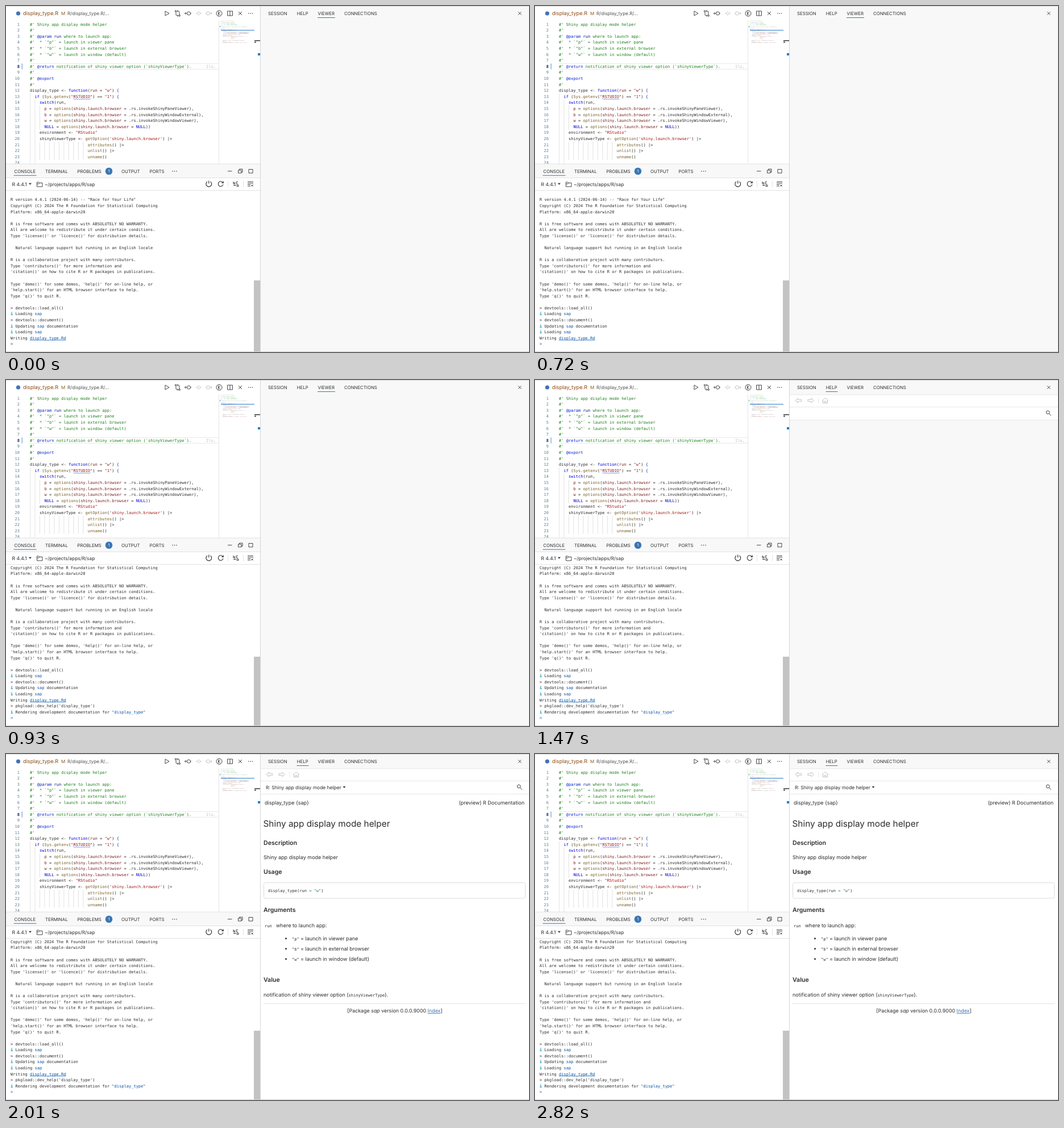
Animation, 920 px wide and 609 px high, one loop 2850 ms. Source, as an HTML page:

```html
<!DOCTYPE html>
<html lang="en">
<head>
<meta charset="utf-8">
<title>Help preview</title>
<style>
  html, body { margin: 0; height: 100%; overflow: hidden; background: #fff; }
  svg { display: block; width: 100vw; height: 100vh; }
  text { font-family: Inter, "Liberation Sans", sans-serif; fill: #2c2c2c; white-space: pre; text-rendering: geometricPrecision; }
  .mono, .mono text { font: 7.05px "DejaVu Sans Mono", monospace; }
  .tab text { font-size: 7.8px; }
  .body text { font-size: 9px; }
  .body .h { font-size: 10.6px; font-weight: 600; }
  .body .mono { font-size: 7.05px; }
  .icon { fill: none; stroke: #333; stroke-width: .9; }
  .pale { stroke: #bdbdbd; }
  .rule { stroke: #e2e2e2; fill: none; }
  .mark { fill: #3a76b4; }
</style>
</head>
<body>
<svg viewBox="0 0 920 609">
  <defs>
    <clipPath id="editClip"><rect y="25" width="447" height="252.5"/></clipPath>
    <clipPath id="conClip"><rect y="325" width="436" height="283"/></clipPath>
  </defs>

  <!-- editor -->
  <rect width="920" height="609" fill="#fff"/>
  <circle cx="21.5" cy="13" r="3.6" fill="#3f74b8"/>
  <text x="30" y="16.3" font-size="9.2" style="fill:#8a4a14">display_type.R</text>
  <text x="97" y="16" font-size="8" style="fill:#8a5a14">M</text>
  <text x="108" y="16.1" font-size="8.2" style="fill:#505050">R/display_type.R/...</text>
  <g class="icon">
    <path d="M280 9l7 4-7 4z"/>
    <path d="M299 10v5a2 2 0 0 0 2 2h2m-1.5-1.500 1.500 1.500-1.500 1.500M305 16v-5a2 2 0 0 0-2-2h-2m1.500-1.500-1.500 1.500 1.500 1.500"/>
    <circle cx="298.600" cy="9" r="1.300"/><circle cx="305.200" cy="17" r="1.300"/>
    <circle cx="321.500" cy="13" r="3"/><path d="M318 13h-3.500m2-2-2 2 2 2M324.500 13h1.500"/>
    <g class="pale">
      <path d="M339 9.800l3.200 3.200-3.200 3.200-3.200-3.200zM334 13h1.800M342.200 13h1.800"/>
      <circle cx="355.500" cy="13" r="3"/><path d="M358.500 13h4m-2-2 2 2-2 2M351 13h1.500"/>
    </g>
    <circle cx="375" cy="13" r="5"/><path d="M373.500 9.500v7M373.500 13l3.500-2.500M373.500 13l3.500 2.500"/>
    <path d="M389.500 9h9v8h-9zM394 9v8"/>
    <path d="M409 10l6 6m0-6-6 6"/>
  </g>
  <g fill="#333"><circle cx="427" cy="13" r=".8"/><circle cx="430.300" cy="13" r=".8"/><circle cx="433.600" cy="13" r=".8"/></g>

  <g clip-path="url(#editClip)">
    <path class="rule" stroke-width=".8" d="M42 101.300H374M42 111.300H374"/>
    <path id="guides" stroke="#d6d6d6" stroke-width=".7"/>
    <g id="nums" class="mono" text-anchor="end"></g>
    <path d="M28.300 101.500v10" stroke="#5b9bd0" stroke-width="1.800" stroke-dasharray="1 .6"/>
    <g id="code" class="mono"></g>
    <path id="wave" fill="none" stroke="#2b6fd6" stroke-width=".7"/>
    <text class="mono" x="352" y="108.700" style="fill:#c4c4c4">Ilo,</text>
  </g>
  <path d="M374.500 25.500V277" stroke="#e4e4e4"/>
  <use href="#code" transform="translate(371.500 22.300) scale(.165 .133)"/>
  <path d="M378 42.700h59" stroke="#4c8fd6" stroke-width="1.300"/>
  <path d="M376.500 35v2.500" stroke="#5aa66a"/>
  <path d="M437 61h10" stroke="#333" stroke-width="1.500"/>
  <path d="M437 62.700h3v2h-3z" fill="#555"/>
  <path d="M443 83h4v4h-4z" fill="#1a7fd0"/>

  <!-- console -->
  <rect y="278" width="447" height="25" fill="#f8f8f8"/>
  <path class="rule" d="M0 278H447M0 302.500H447M0 324.500H447"/>
  <g class="tab">
    <text x="14.500" y="293.500">CONSOLE</text>
    <text x="69" y="293.500">TERMINAL</text>
    <text x="125.500" y="293.500">PROBLEMS</text>
    <text x="203" y="293.500">OUTPUT</text>
    <text x="252.500" y="293.500">PORTS</text>
  </g>
  <path class="mark" d="M13.500 297.700h40v1h-40z"/>
  <circle class="mark" cx="181" cy="290.700" r="6.300"/>
  <text x="181" y="293.200" font-size="7" text-anchor="middle" style="fill:#fff">1</text>
  <g fill="#333"><circle cx="293" cy="290.700" r=".8"/><circle cx="296.500" cy="290.700" r=".8"/><circle cx="300" cy="290.700" r=".8"/></g>
  <text x="10.500" y="316.600" font-size="8.600">R 4.4.1</text>
  <path d="M40 311.800h5l-2.500 3z" fill="#333"/>
  <text x="68" y="316.700" font-size="8.350">~/projects/apps/R/sap</text>
  <g class="icon">
    <path d="M390 290.700h7.500M408.500 289h5.500v5h-5.500zM410.500 289v-2h5.500v5.500h-2M427 287.500h7v6.500h-7z"/>
    <path d="M54.500 310h3.200l1.300 1.400h5v6.600h-9.500zM54.500 313h3.500l1-1.600"/>
    <path stroke-width="1.200" d="M354 309.200a4.900 4.900 0 1 0 5.600 0M356.800 307.500v5"/>
    <path stroke-width="1.100" d="M381.600 311a4.400 4.400 0 1 0 .4 3.200M382.300 308.500v3h-3"/>
    <path d="M400 309v4m0-2h2.500v2H400M408 309.500h-3v3.500h3M400 315.500h4m-1.500-1.300 1.500 1.300-1.500 1.300M406 315h3v2.500h-3z"/>
    <path d="M425 309.500h10M425 312h10M425 314.500h5M425 317h5M431.500 314.500l3 3m0-3-3 3"/>
  </g>
  <path class="rule" d="M390.500 308v11M417.500 308v11"/>
  <g clip-path="url(#conClip)"><g id="console" class="mono"></g></g>
  <rect id="thumb" x="436" width="11" fill="#c3c3c3"/>

  <!-- right panel -->
  <rect x="447" width="473" height="609" fill="#f8f8f8"/>
  <g id="help">
    <rect x="448" y="26" width="472" height="45" fill="#fff"/>
    <path class="rule" stroke-width=".8" d="M448 26H920M448 47.500H920M448 70.500H920M498.500 31v10"/>
    <g class="icon pale">
      <path d="M458 36l4.500-4v2.300h6v3.400h-6V40zM490.500 36l-4.500-4v2.300h-6v3.400h6V40z"/>
      <path d="M505 36.500l5.500-5 5.500 5M506.500 35.500V40.500h8v-5M509 40.500v-3h3v3"/>
    </g>
    <g class="icon" stroke-width="1.100"><circle cx="902.200" cy="57" r="2.900"/><path d="M904.300 59.300l3.500 3.500"/></g>
  </g>
  <g id="page" class="body">
    <rect x="448" y="71" width="472" height="537" fill="#fff"/>
    <text x="457" y="61.700" style="font-size:8.450px">R: Shiny app display mode helper</text>
    <path d="M592.500 57h5l-2.500 3z" fill="#333"/>
    <text x="455" y="88.700">display_type {sap}</text>
    <text x="912" y="88.700" text-anchor="end">(preview) R Documentation</text>
    <text x="452.500" y="127.500" style="font-size:15.350px">Shiny app display mode helper</text>
    <text class="h" x="453" y="160">Description</text>
    <text x="453" y="185.200">Shiny app display mode helper</text>
    <text class="h" x="453" y="211.300">Usage</text>
    <rect class="rule" x="453.500" y="226.500" width="460" height="27.500" rx="3" style="stroke:#dcdcdc"/>
    <text class="mono" x="461" y="243">display_type(run <tspan fill="#2f6fb0">=</tspan> <tspan fill="#2e7d4f">"w"</tspan>)</text>
    <text class="h" x="453" y="277.500">Arguments</text>
    <text class="mono" x="455" y="304.500">run</text>
    <text x="475" y="305">where to launch app:</text>
    <g id="items"></g>
    <text class="h" x="453" y="401.300">Value</text>
    <text x="453" y="426.500">notification of shiny viewer option (<tspan class="mono">shinyViewerType</tspan>).</text>
    <path class="rule" d="M453 439.500H914"/>
    <text x="684" y="455.200" text-anchor="middle" style="font-size:8.900px">[Package <tspan font-style="italic">sap</tspan> version 0.0.0.9000 <tspan fill="#3a76b4" text-decoration="underline">Index</tspan>]</text>
  </g>
  <g class="tab">
    <text x="461" y="15.900">SESSION</text>
    <text x="511.800" y="15.900">HELP</text>
    <text x="548.500" y="15.900">VIEWER</text>
    <text x="595" y="15.900">CONNECTIONS</text>
  </g>
  <rect id="underline" class="mark" y="20" height="1"/>
  <path class="icon" d="M901 10.300l5.400 5.400m0-5.400-5.400 5.400"/>
  <path d="M447.500 0V609" stroke="#d5d5d5"/>
  <path d="M0 .3H920M0 608.500H920" stroke="#c8c8c8" stroke-width=".8"/>
</svg>
<script>
const $ = id => document.getElementById(id);
const CHAR = 4.244, ROW = 10.6, CON_ROW = 10.58;
const esc = s => s.replace(/&/g, "&amp;").replace(/</g, "&lt;");
const span = (color, s) => `<tspan fill="${color}">${s}</tspan>`;
const line = (x, y, s, attrs = "") => `<text x="${x}" y="${y.toFixed(2)}" ${attrs}>${s}</text>`;

const code = `#' Shiny app display mode helper
#'
#' @param run where to launch app:
#'  * \`"p"\` = launch in viewer pane
#'  * \`"b"\` = launch in external browser
#'  * \`"w"\` = launch in window (default)
#'
#' @return notification of shiny viewer option (\`shinyViewerType\`).
#'
#' @export
#'
display_type <- function(run = "w") {
  if (Sys.getenv("RSTUDIO") == "1") {
    switch(run,
      p = options(shiny.launch.browser = .rs.invokeShinyPaneViewer),
      b = options(shiny.launch.browser = .rs.invokeShinyWindowExternal),
      w = options(shiny.launch.browser = .rs.invokeShinyWindowViewer),
      NULL = options(shiny.launch.browser = NULL))
    environment <- "RStudio"
    shinyViewerType <- getOption('shiny.launch.browser') |>
                        attributes() |>
                        unlist() |>
                        unname()

    message(paste("Viewer:", shinyViewerType, environment))
  } else {
    environment <- "other"
    message(paste("Environment:", environment, "without viewer"))
  }`.split("\n");

const tokens = /("[^"]*"|'[^']*')|\b(function|if|else|switch|NULL)\b|([\w.]+(?=\())|([\w.]+(?= = ))|([{}])/g;
function paint(s) {
  if (s.startsWith("#"))
    return span("#1a7f1a", esc(s)
      .replace(/@\w+/, m => span("#0020d0", m))
      .replace(/ run /, m => span("#001080", m)));
  return esc(s).replace(tokens, (m, str, key, call, arg) =>
    span(str ? "#a31515" : key ? "#0000e0" : call ? "#795e26" : arg ? "#7a1c1c" : "#0431c0", m));
}

const baseline = i => 34.55 + i * ROW;
$("code").innerHTML = code.map((s, i) => {
  const text = s.trimStart();
  return line(42 + (s.length - text.length) * CHAR, baseline(i), paint(text));
}).join("");
$("nums").innerHTML = Array.from({length: 24}, (_, i) =>
  line(24, baseline(i), i + 1, `style="fill:${i == 7 ? "#0b216f;font-weight:bold" : "#5f7f8c"}"`)).join("");

// vertical guides: column, first row, last row
const guide = (col, a, b) => `M${42.5 + col * CHAR} ${26.8 + a * ROW}V${26.8 + b * ROW}`;
let guides = guide(0, 12, 24) + guide(2, 13, 24) + guide(4, 14, 18);
for (let col = 4; col < 24; col += 2) guides += guide(col, 20, 23);
$("guides").setAttribute("d", guides);
$("wave").setAttribute("d", "M118.500 164" + "q1 -2 2 0t2 0".repeat(7) + "t2 0");

const log = `R version 4.4.1 (2024-06-14) -- "Race for Your Life"
Copyright (C) 2024 The R Foundation for Statistical Computing
Platform: x86_64-apple-darwin20

R is free software and comes with ABSOLUTELY NO WARRANTY.
All are welcome to redistribute it under certain conditions.
Type 'license()' or 'licence()' for distribution details.

  Natural language support but running in an English locale

R is a collaborative project with many contributors.
Type 'contributors()' for more information and
'citation()' on how to cite R or R packages in publications.

Type 'demo()' for some demos, 'help()' for on-line help, or
'help.start()' for an HTML browser interface to help.
Type 'q()' to quit R.

> devtools::load_all()
i Loading sap
> devtools::document()
i Updating sap documentation
i Loading sap
Writing display_type.Rd
> pkgload::dev_help('display_type')
i Rendering development documentation for "display_type"
>`.split("\n");

const paintLog = s => esc(s)
  .replace(/^i(?= )/, `<tspan fill="#0a8fb8" font-weight="bold">i</tspan>`)
  .replace(/\bsap\b|"display_type"/, m => span("#0451a5", m))
  .replace("display_type.Rd", m => `<tspan fill="#0451a5" text-decoration="underline">${m}</tspan>`);
$("console").innerHTML = log.map((s, i) => line(8, 343.4 + i * CON_ROW, paintLog(s))).join("");
const [command, output, prompt] = [...$("console").children].slice(-3);

const modes = {p: "launch in viewer pane", b: "launch in external browser", w: "launch in window (default)"};
$("items").innerHTML = Object.entries(modes).map(([key, s], i) => {
  const y = 327.8 + i * 18;
  return `<circle cx="492.500" cy="${y - 3}" r="1.500" fill="#2c2c2c"/>` +
    line(503, y - .3, `"${key}"`, 'class="mono"') + line(518, y, "= " + s);
}).join("");

const show = (el, on) => el.style.display = on ? "" : "none";

function draw(now) {
  const t = now % 2850;
  const done = t >= 900, help = t >= 1470;
  show(command, t >= 840);
  show(output, done);
  show(prompt, t < 840 || done);
  prompt.setAttribute("y", 343.4 + (done ? 26 : 24) * CON_ROW);
  prompt.style.fill = t < 60 ? "#333" : "#0451a5";
  $("console").setAttribute("transform", `translate(0 ${done ? -2 * CON_ROW : 0})`);
  const top = done ? 487 : 483;
  $("thumb").setAttribute("y", top);
  $("thumb").setAttribute("height", 608 - top);
  show($("help"), help);
  show($("page"), t >= 1650);
  $("underline").setAttribute("x", help ? 511.5 : 548);
  $("underline").setAttribute("width", help ? 21 : 31);
  requestAnimationFrame(draw);
}
draw(0);
</script>
</body>
</html>
```
